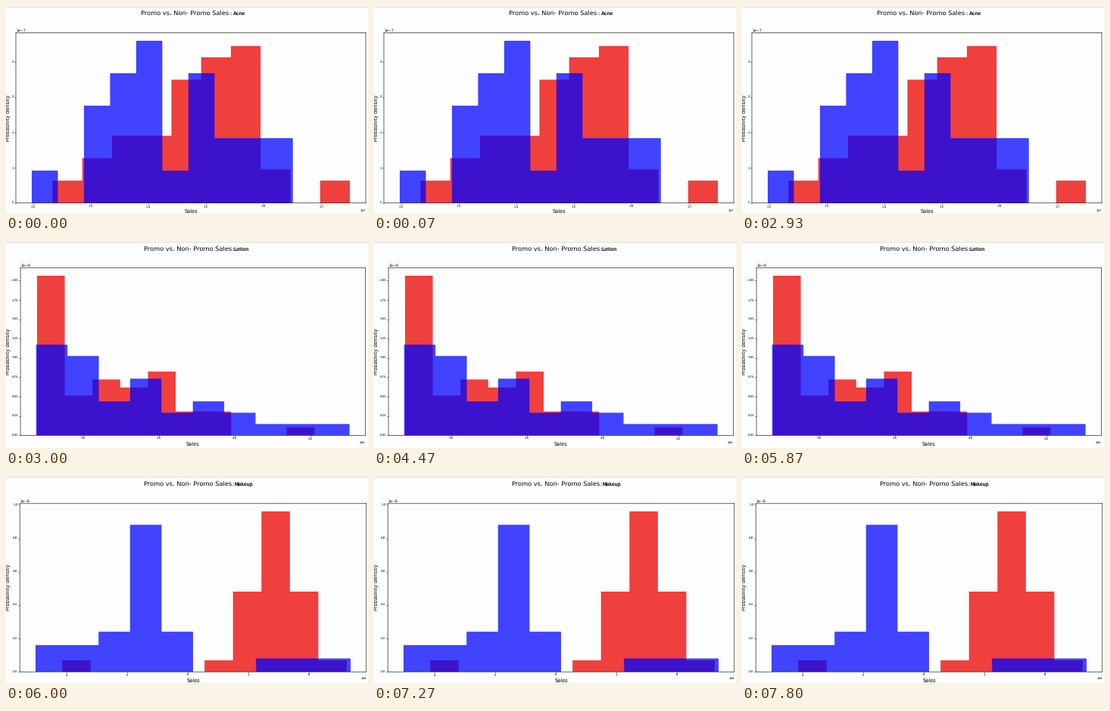
Recreate the animation shown at these times as a matplotlib script. Size 478 by 274 pixels, loop 8990 ms.

```python
import matplotlib.pyplot as plt
import numpy as np
from matplotlib.animation import FuncAnimation
from matplotlib.transforms import IdentityTransform

W, H, DPI = 478, 274, 100
FRAMES, STEP = 155, 58      # 8990 ms per loop
HOLD = 3000                 # ms each chart stays

PAPER = "#fdfdfd"
RED = (0.94, 0.25, 0.24)
BLUE = (0, 0.01, 1, 0.745)


def pt(px):
    return px * 72 / DPI


plt.rcParams.update({
    "font.family": "DejaVu Sans", "text.hinting": "none",
    "axes.facecolor": PAPER, "axes.linewidth": pt(0.6),
})
for axis in ("xtick", "ytick"):
    plt.rcParams.update({
        f"{axis}.labelsize": pt(3.9), f"{axis}.major.size": pt(1.6),
        f"{axis}.major.width": pt(0.5), f"{axis}.major.pad": pt(1.3),
    })

fig = plt.figure(figsize=(W / DPI, H / DPI), dpi=DPI, facecolor=PAPER)
edge = 1 - 0.5 / H
fig.add_artist(plt.Line2D([0, 1], [edge, edge], color="#d9d9d9", lw=pt(1)))

K = np.arange(10)           # bin index


def span(first, last):
    return (K >= first) & (K <= last)


def bell(peak, centre, falloff):
    return np.round(peak * falloff ** ((K - centre) ** 2))


# Sales counts per bin: overall shape plus the odd bump or gap
acne_promo = (2 * np.minimum(K + 1, 3) * span(0, 3) + bell(14, 6, 0.945) * span(4, 6)
              + 3 * span(7, 7) + 2 * span(9, 9))
acne_plain = (span(0, 0) + (K + 1) * span(2, 4) + span(5, 5)
              + 2 * span(6, 9) + 2 * span(6, 6))
lotion_promo = (20 * span(0, 0) + ((K + 9) // 2 + 2 * (K % 2 == 0)) * span(1, 4)
                + 3 * span(5, 6) + span(9, 9))
lotion_plain = np.maximum(8 - K, 1) - 3 * span(2, 2) - 2 * span(4, 4)
makeup_promo = bell(14, 7, 0.5) + span(0, 0)
makeup_plain = bell(11, 3, 0.27) + 2 * span(0, 1) + span(7, 9)


def write(ax, x, y, s, px, ha="center", va="center", **kw):
    """Text at a stage pixel, y counted from the top."""
    ax.text(x, H - y, s, fontsize=pt(px), ha=ha, va=va,
            transform=IdentityTransform(), **kw)


def histogram(ax, counts, low, high, color):
    edges = np.linspace(low, high, len(K) + 1)
    density = counts / (counts.sum() * (edges[1] - edges[0]))
    ax.stairs(density, edges, fill=True, color=color, lw=0).set_snap(False)


def build(name, name_x, title, box, promo, plain):
    left, top, right, base = box
    ax = fig.add_axes([left / W, 1 - base / H, (right - left) / W, (base - top) / H])
    histogram(ax, *promo, RED)
    histogram(ax, *plain, BLUE)
    ax.set_ylim(bottom=0)
    for spine in ax.spines.values():
        spine.set_snap(False)
    ax.xaxis.OFFSETTEXTPAD = 1
    ax.yaxis.OFFSETTEXTPAD = 0.9
    ax.yaxis.get_offset_text().set_fontsize(pt(4.7))

    write(ax, (left + right) / 2, base + 11.6, "Sales", 6.6)
    write(ax, 2.3, (top + base) / 2, "Probability density", 6.6, rotation=90)
    x, y = title
    write(ax, x, y, "Promo vs. Non- Promo Sales", 8.25, ha="left", va="baseline")
    for s, start in ((":", x + 117.3), (name, name_x)):
        write(ax, start, y, s, 6.6, ha="left", va="baseline",
              family="Liberation Sans", weight="bold")
    return ax


panels = [
    build("Acne", 300, (178, 12.2), (13, 35.3, 475, 260.8),
          (acne_promo, 12.334e6, 17.497e6), (acne_plain, 11.974e6, 16.508e6)),
    build("Lotion", 301, (181.5, 13), (19.1, 35.4, 474.3, 257.3),
          (lotion_promo, 2.6975e6, 4.5275e6), (lotion_plain, 2.6915e6, 4.76e6)),
    build("Makeup", 302, (181.5, 13), (18.2, 36.2, 475.8, 259.2),
          (makeup_promo, 3.929e6, 8.625e6), (makeup_plain, 3.4875e6, 8.6875e6)),
]


def draw(i):
    shown = min((i + 1) * STEP // HOLD, len(panels) - 1)
    for k, ax in enumerate(panels):
        ax.set_visible(k == shown)
    return panels


anim = FuncAnimation(fig, draw, frames=FRAMES, interval=STEP, repeat=True,
                     repeat_delay=0, init_func=lambda: draw(0))
plt.show()
```
